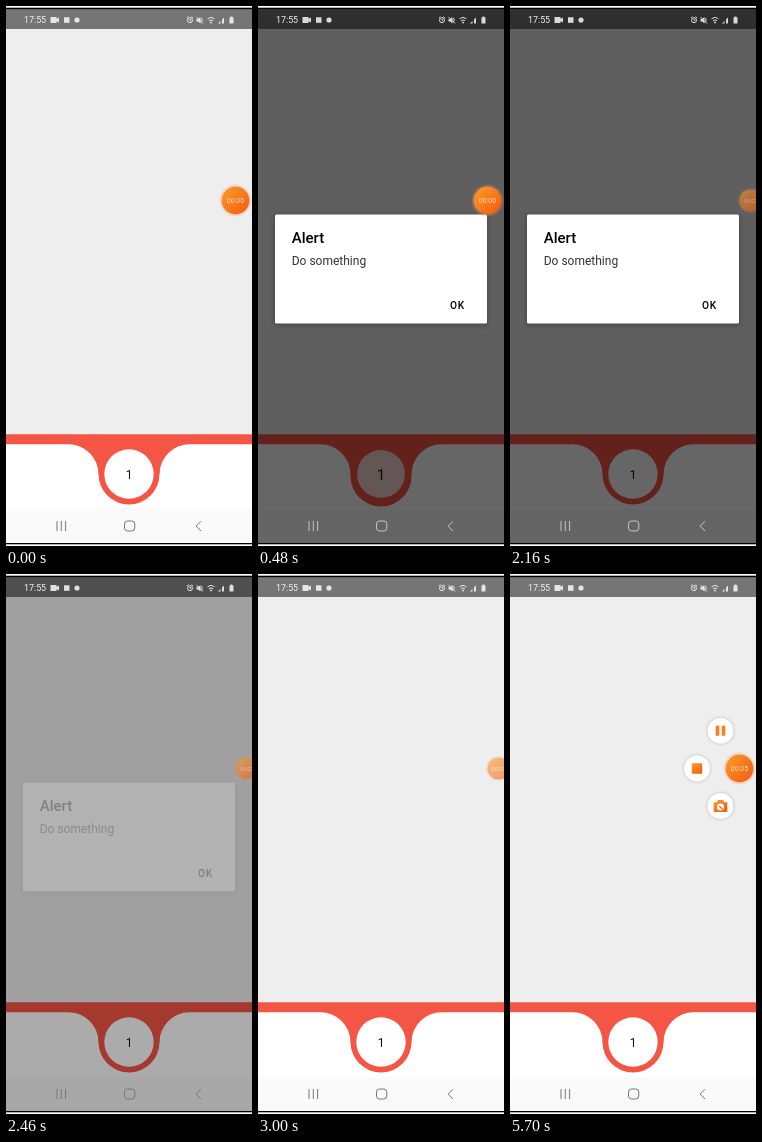
An HTML page that plays this animation: 246 px wide and 540 px high, repeating every 6.06 s.

```html
<!DOCTYPE html>
<html lang="en">
<head>
<meta charset="utf-8">
<title>Tab button alert</title>
<style>
  html, body { margin: 0; height: 100%; overflow: hidden; background: #fff; }
  svg { display: block; width: 100vw; height: 100vh; font-family: Roboto, sans-serif; }
  .card { filter: drop-shadow(0 1.5px 2.5px rgba(0, 0, 0, .35)); }
  .disc { fill: #fff; filter: drop-shadow(0 .5px 1.5px rgba(0, 0, 0, .25)); }
  .medium { font-weight: 500; }
  .line { fill: none; stroke-width: 1; }
</style>
</head>
<body>
<svg viewBox="0 0 246 540">
  <defs>
    <linearGradient id="orange" x1="0" y1="0" x2="1" y2="1">
      <stop offset=".1" stop-color="#fb9726"/>
      <stop offset=".9" stop-color="#f55f12"/>
    </linearGradient>
  </defs>

  <!-- App screen -->
  <rect y="1.700" width="246" height="536.600"/>
  <rect y="3.200" width="246" height="19.800" fill="#757575"/>
  <rect y="23" width="246" height="410" fill="#eee"/>
  <rect y="433" width="246" height="70" fill="#fff"/>
  <rect y="503" width="246" height="34" fill="#fafafa"/>
  <path d="M0 428.300H246V438.300H183.500A30 30 0 0 0 153.500 468H92.500A30 30 0 0 0 62.500 438.300H0Z" fill="#f55545"/>
  <circle id="ring" cx="123" r="30.500" fill="#f55545"/>
  <circle id="knob" cx="123" cy="468" fill="#fff"/>
  <text id="digit" x="123" text-anchor="middle" fill="#111">1</text>

  <rect id="dim" y="3.200" width="246" height="533.800"/>

  <!-- Status bar -->
  <text x="18" y="17.200" font-size="8.900" fill="#f2f2f2">17:55</text>
  <g fill="#fff" opacity=".82">
    <path d="M44.500 11h6v1.800l2.500-1.300v5l-2.500-1.300V17h-6z"/>
    <rect x="58" y="11.300" width="5.500" height="5.500"/>
    <circle cx="71" cy="14" r="2.600"/>
    <g class="line" stroke="#fff">
      <circle cx="184" cy="14.200" r="2.500"/>
      <path d="M184 12.800v1.500h1.300M181 12l1.500-1.300M187 12l-1.500-1.300"/>
      <path d="M190.500 11l6.500 6.500M195.500 12q1.500 2 0 4"/>
      <path d="M201.500 12.800q3.500-3 7 0M203 14.800q2-1.800 4 0"/>
    </g>
    <path d="M190.500 13h1.500l2.500-2v6.500l-2.500-2h-1.500z"/>
    <circle cx="205" cy="16.500" r=".9"/>
    <path d="M212 17.500l2.500-2.500v2.500zM216 17.500v-4l2-2v6z"/>
    <path d="M223.500 11.500h1v-1h2v1h1v6h-4z"/>
  </g>

  <!-- Navigation bar -->
  <g id="nav" class="line" stroke-width="1.200">
    <path d="M51 515v10M55.300 515v10M59.600 515v10M195 515.200l-4.800 4.900 4.800 4.900"/>
    <rect x="118.500" y="515" width="10.300" height="10" rx="3"/>
  </g>

  <!-- Dialog -->
  <g id="dialog">
    <rect class="card" x="17" y="208.400" width="212" height="109" rx="1.500" fill="#fff"/>
    <text class="medium" x="33.700" y="237.200" font-size="15">Alert</text>
    <text x="33.700" y="259.300" font-size="12" fill="#333">Do something</text>
    <text class="medium" x="192" y="302.600" font-size="10.200" letter-spacing=".8">OK</text>
  </g>

  <!-- Recorder menu; items are placed by the script -->
  <g class="item">
    <circle class="disc" r="13"/>
    <path d="M-4.800-5h3.600v10h-3.600zM1.200-5h3.600v10h-3.600z" fill="#f5811f"/>
  </g>
  <g class="item">
    <circle class="disc" r="13"/>
    <rect x="-5.200" y="-5.200" width="10.400" height="10.400" rx=".8" fill="url(#orange)"/>
  </g>
  <g class="item">
    <circle class="disc" r="13"/>
    <path d="M-6.800-3.800h3.200l1-2.200h5.200l1 2.200h3.200v9.800h-13.600z" fill="url(#orange)"/>
    <circle cy="1" r="3.500" fill="#fff"/>
    <path d="M-1.200 0l3.500 3.500" stroke="#f4701a" stroke-width="1.500"/>
  </g>

  <!-- Recorder bubble -->
  <g id="bubble">
    <circle r="16" fill="#f0946a" opacity=".24"/>
    <circle r="13.900" fill="url(#orange)"/>
    <text id="clock" y="2.500" text-anchor="middle" font-size="7" fill="#ffdcb8"></text>
  </g>
</svg>
<script>
const LOOP = 6060, STEP = 60;
const TICKS = [1020, 2160, 3000, 4560, 5400];
const HOME = { x: 229.5, y: 194.5 };
const ITEMS = [[210.5, 156.7], [187, 194.5], [210.5, 232]];

const $ = id => document.getElementById(id);
const items = document.querySelectorAll('.item');
const set = (el, attrs) => { for (const k in attrs) el.setAttribute(k, attrs[k]); };
const ramp = (t, from, to) => Math.min(1, Math.max(0, (t - from) / (to - from)));
const ease = (t, from, to) => { const p = ramp(t, from, to); return p * p * (3 - 2 * p); };
const mix = (a, b, p) => a + (b - a) * p;

function drawButton(t) {
  const press = ease(t, 60, 300) - ease(t, 480, 690);
  set($('ring'), { cy: mix(468, 470, press) });
  set($('knob'), { r: mix(24.7, 23.9, press), opacity: mix(1, 0.77, press) });
  set($('digit'), { 'font-size': mix(12, 14.5, press), y: mix(472.8, 473.5, press) });
}

function drawDialog(t) {
  const closing = ramp(t, 2370, 2570);
  set($('dim'), { opacity: 0.6 * ramp(t, 220, 440) * (1 - closing) });
  set($('dialog'), { opacity: ramp(t, 240, 440) * (1 - closing) ** 2.8 });
  set($('nav'), { stroke: t >= 300 && t < 2400 ? '#c4c4c4' : '#777' });
}

function drawRecorder(t) {
  const idle = t < 5400 ? ease(t, 700, 1200) : 0;
  const x = mix(HOME.x, 240.5, idle);
  set($('bubble'), {
    transform: `translate(${x} ${HOME.y}) scale(${mix(1, 0.8, idle)})`,
    opacity: mix(1, 0.58, idle)
  });
  $('clock').textContent = '00:0' + TICKS.filter(s => t >= s).length;

  const open = ramp(t, 5520, 5700);
  items.forEach((item, i) => set(item, {
    transform: `translate(${mix(HOME.x, ITEMS[i][0], open)} ${mix(HOME.y, ITEMS[i][1], open)}) scale(${open})`,
    opacity: open
  }));
}

function frame(now) {
  const t = Math.floor(now % LOOP / STEP) * STEP;
  drawButton(t);
  drawDialog(t);
  drawRecorder(t);
  requestAnimationFrame(frame);
}
frame(0);
</script>
</body>
</html>
```
